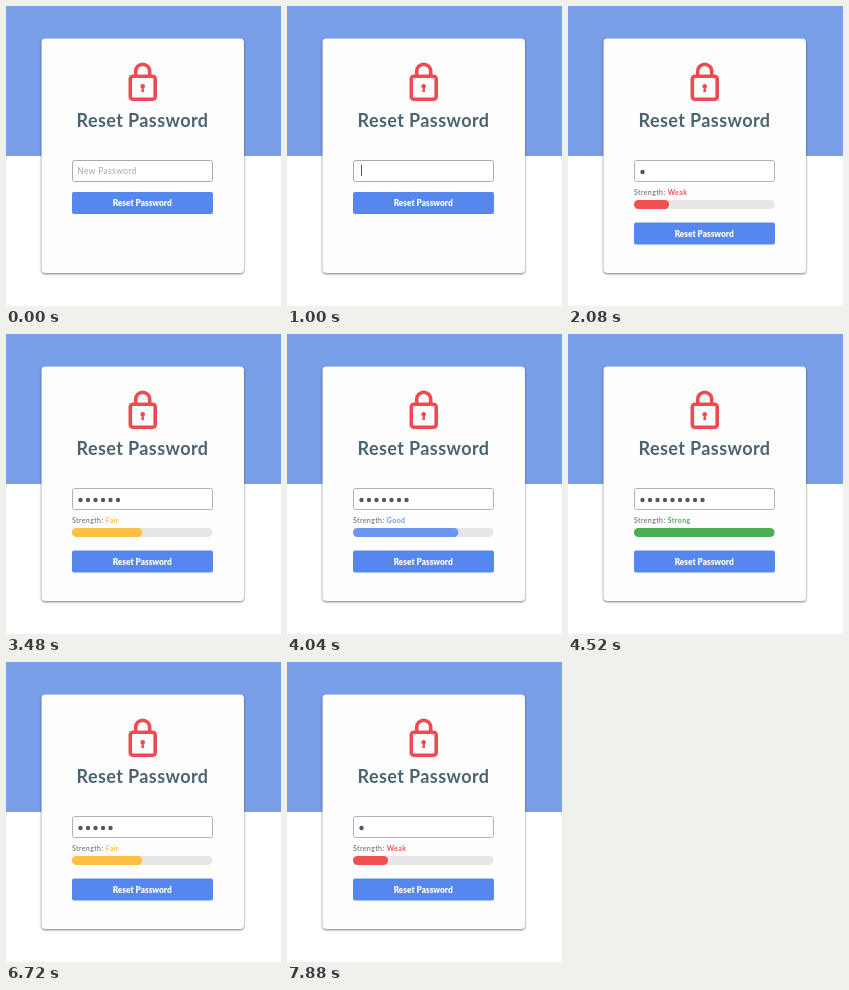
Write an HTML page that moves like this. It is 275x300 px and loops after 8000 ms.

```html
<!DOCTYPE html>
<html lang="en">
<head>
<meta charset="utf-8">
<title>Reset Password</title>
<style>
  html, body { margin: 0; width: 100%; height: 100%; overflow: hidden; background: #fff; }
  svg { display: block; width: 275px; height: 300px; font-family: Lato, "Open Sans", sans-serif; }
  .card { filter: drop-shadow(0 1.5px 1.2px rgba(0, 0, 0, .55)); }
  .title { font-size: 18px; font-weight: 700; letter-spacing: .4px; fill: #4c6470; }
  .hint { font-size: 8.5px; letter-spacing: .35px; fill: #a6a6a8; }
  .label { font-size: 7px; letter-spacing: .4px; fill: #606468; }
  .level { font-weight: 700; }
  .action { font-size: 8.3px; font-weight: 900; fill: #fff; }
</style>
</head>
<body>
<svg viewBox="0 0 275 300">
  <rect width="275" height="300" fill="#fff"/>
  <rect width="275" height="150" fill="#7a9fe9"/>
  <rect class="card" x="35.5" y="32.5" width="202.5" height="234.5" rx="4" fill="#fefefe"/>

  <g fill="none" stroke="#ee4a50" stroke-width="3.6">
    <rect x="124.3" y="70.3" width="24.9" height="23" rx="2.5"/>
    <path d="M129.7 70V65.3a7 7 0 0 1 14 0V70"/>
  </g>
  <g fill="#ee4a50">
    <circle cx="136.7" cy="80.3" r="2.3"/>
    <path d="M135.8 81h1.8l.5 5h-2.8z"/>
  </g>

  <text class="title" x="136.5" y="121" text-anchor="middle">Reset Password</text>

  <rect id="field" x="66.5" y="154.5" width="140" height="21" rx="2" fill="#fff"/>
  <text id="hint" class="hint" x="71.3" y="168.4">New Password</text>
  <rect id="caret" x="74" y="159" width="1" height="11" fill="#55585c"/>
  <g id="dots" fill="#55565c"></g>

  <g id="meter">
    <text class="label" x="66" y="188.7">Strength: <tspan id="level" class="level"></tspan></text>
    <rect x="66" y="194" width="140.5" height="9" rx="4.5" fill="#e6e6e6"/>
    <rect id="bar" x="66" y="194" height="9" rx="4.5"/>
  </g>

  <g id="button">
    <rect x="66" y="186" width="141" height="22" rx="2" fill="#5587ee"/>
    <text class="action" x="136.2" y="200" text-anchor="middle">Reset Password</text>
  </g>
</svg>
<script>
const LOOP = 8000;
const BAR_WIDTH = 140.5;
const CARET_ON = [[1000, 1240], [1680, 2040]];
const LEVELS = [
  ["Weak", "#f05154"],
  ["Fair", "#fdc044"],
  ["Good", "#6c97f0"],
  ["Strong", "#4bae50"],
];
// [time, typed characters, strength level]
const STEPS = [
  [2080, 1, 0], [2280, 2, 0], [2480, 3, 0],
  [3120, 4, 1], [3280, 5, 1], [3480, 6, 1],
  [4040, 7, 2], [4280, 8, 2], [4480, 9, 3],
  [5760, 8, 2], [6000, 7, 2], [6240, 6, 2],
  [6720, 5, 1], [6920, 4, 1], [7160, 3, 1],
  [7680, 2, 0], [7880, 1, 0],
];

const el = id => document.getElementById(id);
const show = (node, on) => node.setAttribute("visibility", on ? "visible" : "hidden");

const dots = Array.from({ length: 9 }, (_, i) => {
  const dot = document.createElementNS("http://www.w3.org/2000/svg", "circle");
  dot.setAttribute("cx", 74.5 + i * 7.5);
  dot.setAttribute("cy", 166);
  dot.setAttribute("r", 2.2);
  return el("dots").appendChild(dot);
});

function render(time) {
  const [, count, level] = STEPS.findLast(([start]) => time >= start) || [0, 0, 0];
  const [name, color] = LEVELS[level];
  const typing = count > 0;

  show(el("hint"), time < 1000);
  show(el("caret"), CARET_ON.some(([from, to]) => time >= from && time < to));
  el("field").setAttribute("stroke", time < 2040 ? "#a9a9ae" : "#b0b0c2");
  dots.forEach((dot, i) => show(dot, i < count));

  show(el("meter"), typing);
  el("level").textContent = name;
  el("level").setAttribute("fill", color);
  el("bar").setAttribute("fill", color);
  el("bar").setAttribute("width", BAR_WIDTH * (level + 1) / LEVELS.length);
  el("button").setAttribute("transform", `translate(0 ${typing ? 30.5 : 0})`);
}

const begin = performance.now();
function tick() {
  render((performance.now() - begin) % LOOP);
  requestAnimationFrame(tick);
}
tick();
</script>
</body>
</html>
```
